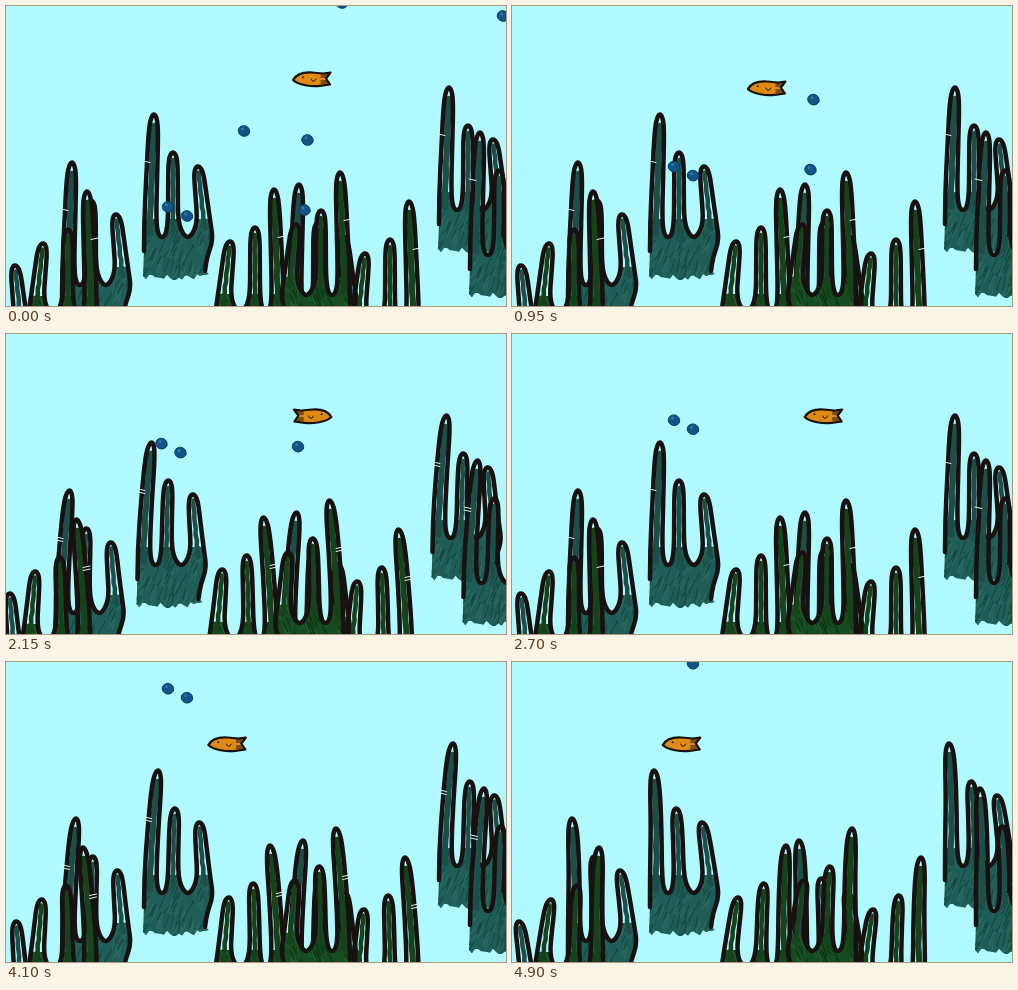
Recreate the animation shown at these times as an HTML page with a canvas. Size 500 px wide and 300 px high, loop 4.95 s.

```html
<!DOCTYPE html>
<html lang="en">
<head>
<meta charset="utf-8">
<title>Fish among the seaweed</title>
<style>
  html, body { margin: 0; width: 100%; height: 100%; overflow: hidden; background: #b0faff; }
  canvas { display: block; width: 500px; height: 300px; }
</style>
</head>
<body>
<canvas id="stage" width="500" height="300"></canvas>
<script>
const ctx = document.getElementById('stage').getContext('2d');
const LOOP = 4950, STEP = 50;
const WATER = '#b0faff', INK = '#17110f';
const TEAL = { fill: '#1f5d57', dark: '#174844', light: '#296b63', stalk: '#1d4f4a' };
const GREEN = { fill: '#164a20', dark: '#0e3414', light: '#1f5c2a', stalk: '#16431b' };

// Each stalk leans from its tip to its foot; half is its half-width there.
const FOOT = 108;
const STALKS = [
  { tip: 1, top: 0, foot: -3, half: 6, core: 6 },
  { tip: 20, top: 38, foot: 20, half: 5, core: 4.5 },
  { tip: 45, top: 52, foot: 51, half: 6.5, core: 4.5 }
];

const BACK = [[-36, 208], [65, 157], [147, 109], [292, 179], [442, 82], [473, 127]];
const FRONT = [[269, 184], [335, 167], [404, 196], [82, 186]];

// The seaweed cycles through three drawings.
const POSES = [{ lean: 0, ticks: 1 }, { lean: 4, ticks: 2 }, { lean: -6, ticks: 0 }];
const POSE_TIME = 111;

const BUBBLES = [
  { x: 336, y: -3 }, { x: 497, y: 10 }, { x: 162, y: 201 }, { x: 181, y: 210 },
  { x: 238, y: 125, bursts: 850 }, { x: 301.5, y: 134, bursts: 1550 }, { x: 298.5, y: 204, bursts: 2600 }
];
const RISE = 0.0425;

const SPEED = 0.0645, TURN_RIGHT = 1100, TURN_LEFT = 2415, FAR_LEFT = 245.2;
const DIVE_START = 650, DIVE_TIME = 157, DIVE_DEPTH = 9;

const clamp01 = v => Math.min(1, Math.max(0, v));
const mix = (a, b, k) => a + (b - a) * k;

function random(seed) {
  return () => (seed = (seed * 16807) % 2147483647) / 2147483647;
}

function smooth(points) {
  ctx.beginPath();
  ctx.moveTo(...points[0]);
  for (let i = 1; i < points.length - 1; i++) {
    const [x, y] = points[i], [nx, ny] = points[i + 1];
    ctx.quadraticCurveTo(x, y, (x + nx) / 2, (y + ny) / 2);
  }
  ctx.lineTo(...points[points.length - 1]);
}

function stroke(color, width) {
  ctx.strokeStyle = color;
  ctx.lineWidth = width;
  ctx.stroke();
}

// A point on a stalk: k runs from the tip to the foot, side from -1 to 1.
function onStalk(s, k, side) {
  return [mix(s.tip, s.foot, k) + side * mix(4.6, s.half, k), mix(s.top, FOOT, k)];
}

function plantOutline() {
  const points = [[-9, 136]];
  STALKS.forEach((s, i) => {
    for (const k of [1, 0.5, 0.12]) points.push(onStalk(s, k, -1));
    points.push([s.tip - 2, s.top - 0.5], [s.tip + 2, s.top - 0.5]);
    for (const k of [0.12, 0.5, 1]) points.push(onStalk(s, k, 1));
    const next = STALKS[i + 1];
    if (next) {
      const valley = (s.foot + s.half + next.foot - next.half) / 2;
      points.push([valley - 3, FOOT + 14], [valley + 3, FOOT + 14]);
    }
  });
  return [...points, [60, 125], [54, 142], [52, 156]];
}
const OUTLINE = plantOutline();

function drawBase(outline, colors) {
  const rnd = random(77);
  ctx.save();
  smooth(outline);
  for (let x = 56; x >= -10; x -= 3) ctx.lineTo(x, 159 + rnd() * 6);
  ctx.clip();
  ctx.fillStyle = colors.fill;
  ctx.fillRect(-20, FOOT - 4, 90, 70);
  for (let i = 0; i < 90; i++) {
    const x = -12 + rnd() * 72, y = 100 + rnd() * 58;
    ctx.beginPath();
    ctx.moveTo(x, y);
    ctx.lineTo(x - 2 - rnd() * 5, y + 6 + rnd() * 8);
    stroke(i % 2 ? colors.dark : colors.light, 1.3);
  }
  ctx.restore();
}

function drawPlant([x, y], flip, colors, pose) {
  const bend = ([px, py]) => [px + pose.lean * (Math.max(0, 120 - py) / 120) ** 2, py];
  const outline = OUTLINE.map(bend);
  ctx.save();
  ctx.translate(x, y);
  ctx.scale(flip, 1);

  drawBase(outline, colors);
  for (const s of STALKS) {
    const line = [];
    for (let k = 0.1; k < 1.1; k += 0.1) line.push(bend(onStalk(s, k, 0.12 * Math.sin(k * 25))));
    smooth(line);
    stroke(colors.stalk, s.core);
  }
  smooth(outline);
  stroke(INK, 4.5);

  for (let i = 0; i < pose.ticks; i++) {
    ctx.beginPath();
    ctx.moveTo(...bend([-10, 46 + i * 3]));
    ctx.lineTo(...bend([-3, 47.5 + i * 3]));
    stroke('#d8f8f8', 1);
  }
  ctx.restore();
}

function drawBubble(x, y) {
  ctx.beginPath();
  ctx.ellipse(x, y, 5.8, 5.3, 0.3, 0, Math.PI * 2);
  ctx.fillStyle = '#125488';
  ctx.fill();
  stroke('#0d3c63', 1);
  ctx.beginPath();
  ctx.arc(x - 1.5, y - 2, 1.4, 0, Math.PI * 2);
  ctx.fillStyle = '#367ba6';
  ctx.fill();
}

function drawFish(x, y, flip) {
  ctx.save();
  ctx.translate(x, y);
  ctx.scale(flip, 1);
  ctx.beginPath();
  ctx.moveTo(-19, 1);
  ctx.bezierCurveTo(-15, -6, -8, -7, 0, -6.5);
  ctx.lineTo(11, -5.5);
  ctx.lineTo(18.5, -6.5);
  ctx.lineTo(14, -0.5);
  ctx.lineTo(18, 5.5);
  ctx.lineTo(8, 6.8);
  ctx.bezierCurveTo(0, 8, -14, 6, -19, 1);
  ctx.closePath();
  ctx.fillStyle = '#e08a14';
  ctx.fill();
  stroke(INK, 2.2);
  ctx.beginPath();
  for (const side of [-1, 1]) {
    for (const d of [0, 2]) {
      ctx.moveTo(9, side * (2 + d));
      ctx.lineTo(15.5, side * (2 + d));
    }
  }
  ctx.moveTo(-1, 0);
  ctx.quadraticCurveTo(1, 5, 4, 0);
  stroke(INK, 1);
  ctx.fillStyle = INK;
  ctx.fillRect(-10, -2.5, 1.8, 1.5);
  ctx.restore();
}

function fishAt(t) {
  const dive = clamp01((t - DIVE_START) / DIVE_TIME);
  const y = 73 + DIVE_DEPTH * dive;
  if (t < TURN_RIGHT) {
    // Swimming left stops while it dives.
    const remaining = TURN_RIGHT - t - DIVE_TIME * (1 - dive);
    return { x: FAR_LEFT + SPEED * remaining, y, right: false };
  }
  const out = Math.min(t, TURN_LEFT) - TURN_RIGHT, back = Math.max(0, t - TURN_LEFT);
  return { x: FAR_LEFT + SPEED * (out - back), y, right: t < TURN_LEFT };
}

function draw(t) {
  const fish = fishAt(t);
  const pose = POSES[Math.floor((t + POSE_TIME / 2) / POSE_TIME) % POSES.length];

  ctx.fillStyle = WATER;
  ctx.fillRect(0, 0, 500, 300);
  ctx.save();
  // The view looks slightly ahead while the fish heads right.
  if (fish.right) ctx.translate(-6.5, 0);
  BACK.forEach(p => drawPlant(p, 1, TEAL, pose));
  FRONT.forEach(p => drawPlant(p, -1, GREEN, pose));
  for (const { x, y, bursts = LOOP } of BUBBLES) {
    if (t < bursts) drawBubble(x, y - RISE * t);
  }
  drawFish(fish.x, fish.y, fish.right ? -1 : 1);
  ctx.restore();
}

ctx.lineCap = ctx.lineJoin = 'round';
const start = performance.now();
function tick() {
  const t = (performance.now() - start) % LOOP;
  draw(Math.floor(t / STEP) * STEP);
  requestAnimationFrame(tick);
}
tick();
</script>
</body>
</html>
```
